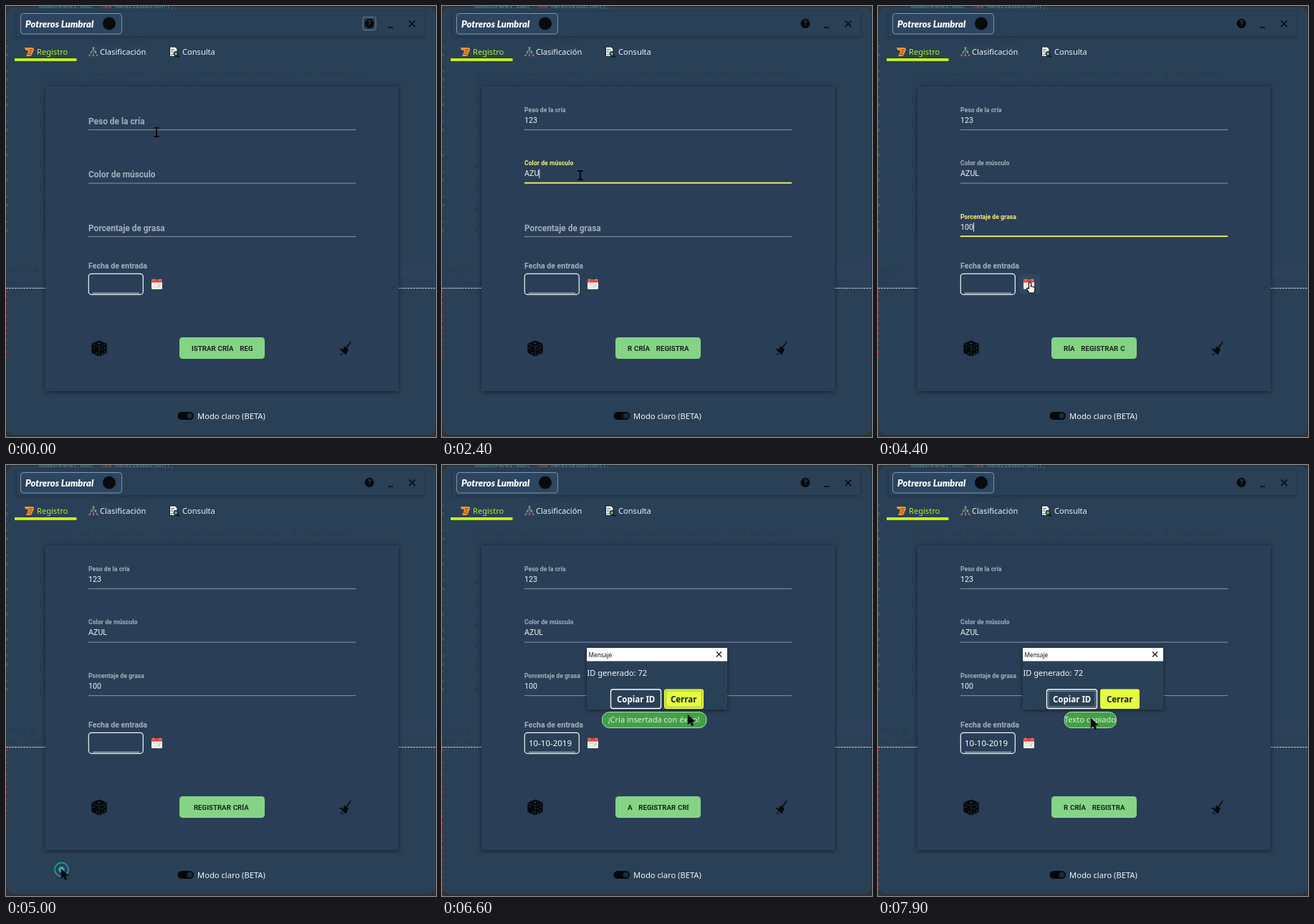
These frames come from a looping animation (600x601 px, 8 s). An HTML page:

```html
<!DOCTYPE html>
<html lang="es">
<head>
<meta charset="utf-8">
<style>
html, body { margin: 0; width: 100%; height: 100%; overflow: hidden; background: #303335; }
svg { display: block; width: 600px; height: 601px; font: 11.1px "Noto Sans", sans-serif; }
text { white-space: pre; }
.roboto { font-family: Roboto, sans-serif; }
.label { font-weight: 700; fill: #a3afba; }
.value { font-size: 10.7px; fill: #f2f5f7; }
.code { font: 8px "Noto Sans Mono", monospace; fill: #243a4f; }
.bold { font-weight: 700; font-size: 11.5px; }
.raised { filter: drop-shadow(0 1px 3px #0008); }
.bar { filter: drop-shadow(0 1px 2px #0005); }
.toast rect { fill: #43a047; stroke: #b4dcb7; }
.toast text { fill: #e0eee1; font-size: 11px; text-anchor: middle; }
.dots { fill: none; stroke-dasharray: 1 1; }
</style>
</head>
<body>
<svg viewBox="0 0 600 601">
  <!-- window and the editor showing through it -->
  <rect x="1" y="1.5" width="598" height="596.5" rx="10" fill="#2a4057"/>
  <text class="code" x="46" y="2.5" style="fill:#3a9fa5">DomainPanel.add( <tspan x="133" fill="#a8524e">new</tspan> MaterialButton();</text>
  <g class="code">
    <text x="115" y="51">.setLayout(layout);</text>
    <text id="code1" x="46" y="98"></text>
    <text id="code2" x="46" y="107"></text>
    <text id="console" y="373"></text>
    <text x="0" y="390">Main [Java App</text>
  </g>
  <path d="M1.5 55V335" stroke="#8797a2" stroke-width="2" stroke-dasharray="2 9 4 7 1 12" opacity=".3"/>
  <path d="M48 120V330" stroke="#22374b" stroke-width="3" stroke-dasharray="3 8 5 14" opacity=".6"/>
  <rect x="548" y="357" width="51" height="22" fill="#3a4e63" opacity=".2"/>
  <path d="M0 393.5H55M548 393.5H600" stroke="#c5cdd3" stroke-dasharray="3 1"/>
  <path id="errors" stroke="#b3203a" stroke-width="2" stroke-dasharray="3 5 2 7" opacity=".7"/>

  <!-- title bar -->
  <rect class="bar" x="15" y="8" width="569" height="34" fill="#2a4057"/>
  <rect x="20.500" y="10.500" width="141" height="28.500" rx="4" fill="#2c4560" stroke="#7f95ab"/>
  <text x="27" y="29.500" style="font:italic 900 13px Lato,sans-serif" fill="#fff">Potreros Lumbral</text>
  <circle cx="144" cy="24.500" r="9" fill="#080b0e"/>
  <circle cx="507" cy="24.500" r="6.500" fill="#05080b"/>
  <text class="roboto" x="507" y="28.300" text-anchor="middle" font-size="10.500" font-weight="700" fill="#2a4057">?</text>
  <rect id="helpFocus" class="dots" x="498" y="15.500" width="18" height="18" rx="2" stroke="#b5c0ca"/>
  <path d="M533 30H540M562.500 20.500L571 29M571 20.500L562.500 29" stroke="#05080b" stroke-width="1.600"/>

  <!-- tabs -->
  <path d="M26 58H36Q39.500 58 39 61L36.500 67Q36 70 33 70H28L31 63Q31 61 27 61.500Z" fill="#ef9438"/>
  <path d="M32 61H37M32 64H36M30 67H35" stroke="#6d4019"/>
  <text x="43" y="68" fill="#b3f02e">Registro</text>
  <rect x="12" y="73" width="86.500" height="3.800" fill="#c9fa10"/>
  <path d="M122 59L117 69M122 59L127 69M122 59V69" stroke="#8a9aa8" stroke-width=".8"/>
  <g fill="#65b55b"><circle cx="122" cy="58.500" r="1.400"/><circle cx="119" cy="64" r="1.200"/></g>
  <circle cx="125" cy="64" r="1.200" fill="#e0a33d"/>
  <g fill="#dd6255"><circle cx="116.500" cy="69" r="1.200"/><circle cx="122" cy="69" r="1.200"/><circle cx="127.500" cy="69" r="1.200"/></g>
  <text x="131" y="68" fill="#eef2f5">Clasificación</text>
  <path d="M228.500 57H236L239 60V70.500H228.500Z" fill="#f3f6f4" stroke="#101820"/>
  <path d="M230 61H235M230 64H233M230 68H233" stroke="#3f5565"/>
  <circle cx="237" cy="66.500" r="2.800" fill="#55a879" stroke="#101820" stroke-width="1.200"/>
  <path d="M239 69L242 71.500" stroke="#101820" stroke-width="2"/>
  <text x="246" y="68" fill="#eef2f5">Consulta</text>

  <!-- form -->
  <rect class="raised" x="55" y="112" width="493" height="425" fill="#2a3f57"/>
  <g id="fields" class="roboto"></g>
  <text class="roboto label" x="115" y="365.500" font-size="10.600">Fecha de entrada</text>
  <rect x="115.300" y="373.300" width="76" height="29" rx="4" fill="none" stroke="#f0f3f5" stroke-width="1.200"/>
  <path d="M121 400.300H186" stroke="#c9d1d8"/>
  <text id="date" x="121" y="391.500" font-size="11.500" fill="#fff">10-10-2019</text>
  <rect id="dateHover" x="197" y="374" width="29" height="28" rx="3" fill="#30475f"/>
  <rect x="203" y="381" width="15" height="14" rx="1.500" fill="#f4efe9"/>
  <path d="M203 385.500V382.500Q203 381 204.500 381H216.500Q218 381 218 382.500V385.500Z" fill="#dc4a3e"/>
  <path d="M206 380.500V383M215 380.500V383" stroke="#f7c5be"/>
  <path d="M206 388.500H216M205 392H215" stroke="#d6cfca" stroke-dasharray="2 2"/>
  <path d="M212 391.500L215 388.500" stroke="#e58a38"/>

  <g fill="#05080b" stroke="#2a3f57" stroke-width=".7" stroke-linejoin="round">
    <path d="M130 466L141 470.500V484L130 489L119 484V470.500Z"/>
    <path d="M119.500 471L130 475.500L140.500 471M130 475.500V489" fill="none"/>
  </g>
  <g fill="#2a3f57">
    <ellipse cx="130" cy="470.500" rx="1.800" ry=".9"/>
    <circle cx="122.500" cy="477" r="1"/><circle cx="126.500" cy="484" r="1"/>
    <circle cx="134" cy="479" r="1"/><circle cx="137.500" cy="476.500" r="1"/>
    <circle cx="134" cy="485" r="1"/><circle cx="137.500" cy="482.500" r="1"/>
  </g>
  <path d="M481 468.500L475 476.500" stroke="#05080b" stroke-width="1.500" stroke-linecap="round"/>
  <path d="M472 474.500L478 478.500L474.500 486.500L468 481.500Q471 479 472 474.500ZM464 478H470L468.500 480.500ZM467 484L471 486.500H467Z" fill="#05080b"/>
  <rect x="242" y="462" width="119" height="30" rx="4.500" fill="#85d385"/>
  <text id="button" class="roboto" x="259" y="480.500" font-size="9.700" font-weight="700" word-spacing=".5" fill="#14241a"></text>

  <rect x="239.500" y="566" width="22.500" height="11" rx="5.500" fill="#05080b"/>
  <circle cx="256.500" cy="571.500" r="3.800" fill="#1d2b3a"/>
  <text x="267" y="575.500" font-size="11.200" fill="#f2f5f7">Modo claro (BETA)</text>

  <!-- message box -->
  <g id="dialog">
    <rect class="raised" x="202" y="255" width="196" height="86" fill="#2a4057"/>
    <rect x="202" y="255" width="196" height="18.500" fill="#fff"/>
    <text x="204.500" y="267.500" font-size="8.300" fill="#111">Mensaje</text>
    <path d="M383 260.500L390 267.500M390 260.500L383 267.500" stroke="#111" stroke-width="1.200"/>
    <text x="202.500" y="294" fill="#f4f6f8">ID generado: 72</text>
    <rect x="235.500" y="313" width="70" height="26.500" rx="3" fill="#2a4057" stroke="#fff" stroke-width="1.300"/>
    <text class="bold" x="244" y="330.500" fill="#fff">Copiar ID</text>
    <rect x="310" y="312.500" width="55" height="27.500" rx="3" fill="#e5fc40"/>
    <text class="bold" x="319" y="330.500" fill="#14202b">Cerrar</text>
    <rect id="copyFocus" class="dots" x="238" y="315.500" width="65" height="21.500" stroke="#c5ced6"/>
    <rect id="closeFocus" class="dots" x="312.500" y="315" width="50" height="22.500" stroke="#5d6a30"/>
  </g>
  <g id="saved" class="toast">
    <rect x="223.500" y="344.500" width="145.500" height="22" rx="10"/>
    <text x="295.500" y="359">¡Cría insertada con éxito!</text>
  </g>
  <g id="copied" class="toast">
    <rect x="260" y="344.500" width="72.500" height="22" rx="10"/>
    <text x="296" y="359">Texto copiado</text>
  </g>

  <g id="ring" fill="none" stroke="#1fa8a0" stroke-width="1.500">
    <circle cx="77.500" cy="564" r="9.500"/><circle cx="77.500" cy="564" r="3.500" fill="#2cc0b4"/>
  </g>
  <g id="pointer">
    <path id="beam" d="M-3.500 -6H-1Q0 -6 0 -5Q0 -6 1 -6H3.500M0 -5V5M-3.500 6H-1Q0 6 0 5Q0 6 1 6H3.500" fill="none" stroke="#05080b" stroke-width="2"/>
    <path id="arrow" d="M0 0V14L3.300 11L5.500 16L8 15L5.800 10H10.500Z" fill="#05080b" stroke="#1b2733" stroke-width=".5"/>
    <path id="hand" d="M-1.500 0Q0 -2 1.500 0V5L6 6Q7.500 6.500 7 9L6 14H-1L-4.500 8.500Q-4 6.500 -1.500 8Z" fill="#fff" stroke="#05080b" stroke-width="1.200"/>
  </g>
</svg>
<script>
const LOOP = 8000;
const $ = id => document.getElementById(id);
const clamp = v => Math.max(0, Math.min(1, v));
const ease = v => (v = clamp(v)) * v * (3 - 2 * v);
const mix = (a, b, k) => a + (b - a) * k;
const show = (id, on) => $(id).style.display = on ? '' : 'none';
const set = (el, attrs) => { for (const k in attrs) el.setAttribute(k, attrs[k]); };

// Finds the key before t and the progress towards the next one.
function segment(keys, t) {
  const i = keys.findLastIndex(k => k[0] <= t);
  const a = keys[i], b = keys[i + 1] || a;
  return { a, b, k: a === b ? 0 : (t - a[0]) / (b[0] - a[0]) };
}

const fields = [
  { label: 'Peso de la cría', value: '123', focus: 400, blur: 1700, keys: [900, 1100, 1300] },
  { label: 'Color de músculo', value: 'AZUL', focus: 1700, blur: 2900, keys: [2100, 2250, 2400, 2550] },
  { label: 'Porcentaje de grasa', value: '100', focus: 2900, blur: 4500, keys: [3700, 3850, 4000] }
];
fields.forEach((f, i) => {
  const y = f.y = 172.6 + 74.5 * i;
  const g = document.createElementNS('http://www.w3.org/2000/svg', 'g');
  g.innerHTML = `<path d="M115 ${y}H488" stroke="#8796a5"/><path stroke="#f3ed67" stroke-width="1.800"/>
    <text class="label" x="115">${f.label}</text><text class="value" x="115" y="${Math.floor(y - 9.5)}"></text>
    <path stroke="#f2f5f7"/>`;
  $('fields').append(g);
  [, f.line, f.title, f.text, f.caret] = g.children;
});

// time, x, y, shape
const path = [
  [0, 210, 176, 'beam'], [1000, 210, 176, 'beam'], [1400, 193, 236, 'beam'], [3950, 193, 236, 'beam'],
  [4300, 212, 386, 'hand'], [4500, 212, 386, 'arrow'], [4900, 77, 563, 'arrow'], [5250, 77, 563, 'arrow'],
  [5600, 300, 476, 'hand'], [6000, 300, 476, 'arrow'], [6350, 343, 348, 'arrow'], [6850, 343, 348, 'arrow'],
  [7300, 284, 322, 'arrow'], [7600, 284, 322, 'arrow'], [7850, 297, 353, 'arrow']
];
// time, characters scrolled
const scroll = [[0, 3], [1500, 17], [3300, 34], [4400, 45], [5000, 50], [6600, 64], [7900, 76], [8000, 77]];
const caption = 'REGISTRAR CRÍA   ';

function drawField(f, t) {
  const active = t >= f.focus && t < f.blur;
  const up = ease((t - f.focus) / 200);
  const half = 186.5 * up;
  set(f.title, { y: mix(f.y - 8, f.y - 25, up), 'font-size': mix(11.9, 8.7, up) });
  f.title.style.fill = active ? '#f5ef72' : '';
  set(f.line, { d: active ? `M${301.5 - half} ${f.y - .4}H${301.5 + half}` : '' });
  const count = f.keys.filter(k => k <= t).length;
  f.text.textContent = f.value.slice(0, count);
  const last = count ? f.keys[count - 1] : f.focus;
  const x = 115.5 + (count ? f.text.getComputedTextLength() : 0);
  const blink = active && (t - last) % 1000 < 500;
  set(f.caret, { d: blink ? `M${x} ${f.y - 19.5}V${f.y - 7}` : '' });
}

function draw(t) {
  fields.forEach(f => drawField(f, t));

  const s = segment(scroll, t);
  const n = Math.floor(mix(s.a[1], s.b[1], s.k) + 1e-6) % caption.length;
  $('button').textContent = caption.slice(n) + caption.slice(0, n);

  const p = segment(path, t), k = ease(p.k), shape = p.a[3];
  set($('pointer'), { transform: `translate(${mix(p.a[1], p.b[1], k)} ${mix(p.a[2], p.b[2], k)})` });
  for (const id of ['beam', 'arrow', 'hand']) show(id, id === shape);

  show('helpFocus', t < 400);
  show('dateHover', t >= 4250 && t < 4550);
  show('ring', t >= 4900 && t < 5200);
  show('date', t >= 5250);
  show('dialog', t >= 6050);
  show('closeFocus', t < 7500);
  show('copyFocus', t >= 7500);
  $('saved').style.opacity = clamp((t - 6200) / 300) * clamp((7150 - t) / 300);
  $('copied').style.opacity = clamp((t - 7600) / 300);

  const edited = t >= 4100;
  $('code1').textContent = edited
    ? 'btn.setup = new MaterialButton(... .createImage("materialicon/plus.png", 30, 30.getImage());'
    : 'btnSimplante = new CorralImage(... .createComponent("materialicon/vaca.png", 30, 30.getImage());';
  $('code2').textContent = edited
    ? 'btn.setIcon.setBackground(... .color.HAND_SOW);'
    : 'btnSimplante.setBackground(... .color.HAND_SOW);';
  $('console').textContent = edited ? 'onsole ✖' : 'Console ✖';
  set($('errors'), { d: `M1 396V${t < 6000 ? 490 : 601}` });
}

function tick(now) {
  draw(now % LOOP);
  requestAnimationFrame(tick);
}
draw(0);
requestAnimationFrame(tick);
</script>
</body>
</html>
```
